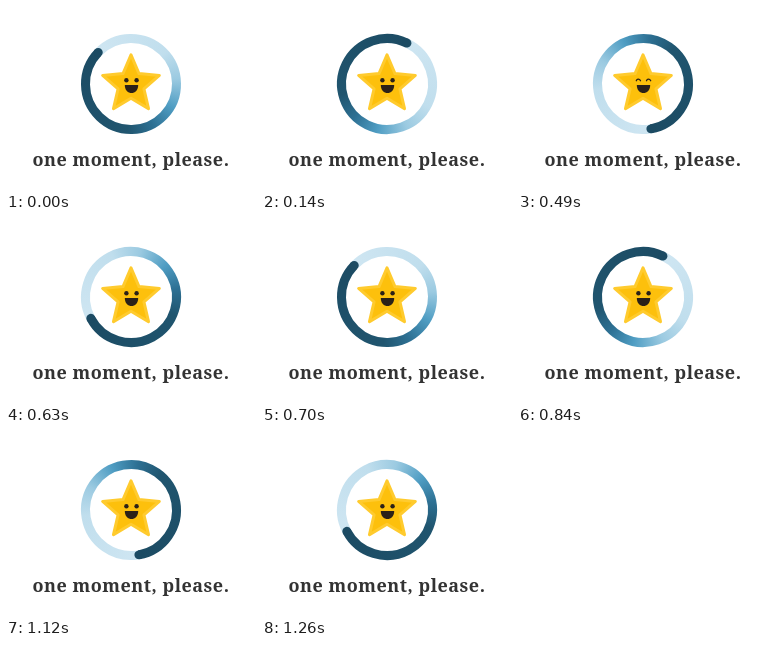
An HTML page with a canvas for the animation above (1400 ms loop, 250 by 185 pixels).

```html
<!DOCTYPE html>
<html lang="en">
<head>
<meta charset="utf-8">
<title>One moment, please</title>
<style>
  html, body { margin: 0; width: 100%; height: 100%; overflow: hidden; background: #fff; }
  canvas { display: block; width: 250px; height: 185px; }
</style>
</head>
<body>
<canvas id="stage"></canvas>
<script>
const W = 250, H = 185, LOOP = 1400, STEP = 140;
const CX = 125, CY = 78, RING = 45.5, BAND = 9;
const TAU = Math.PI * 2, DEG = Math.PI / 180;
const INK = '#2b2118';

const canvas = document.getElementById('stage');
const ctx = canvas.getContext('2d');
const dpr = window.devicePixelRatio || 1;
canvas.width = W * dpr;
canvas.height = H * dpr;

function dot(x, y, r, color) {
  ctx.fillStyle = color;
  ctx.beginPath();
  ctx.arc(x, y, r, 0, TAU);
  ctx.fill();
}

// The ring fades from its pale tail clockwise to the dark rounded head.
function drawRing(turn) {
  ctx.save();
  ctx.translate(CX, CY);
  ctx.rotate((turn - 90) * DEG);
  const fade = ctx.createConicGradient(0, 0, 0);
  const stops = [
    [0, '#cfe6f2'], [0.26, '#c0deed'], [0.36, '#9bcae1'], [0.46, '#4f9dc3'],
    [0.55, '#2d7093'], [0.64, '#20556f'], [1, '#1c4b63']
  ];
  for (const [at, color] of stops) fade.addColorStop(at, color);
  ctx.strokeStyle = fade;
  ctx.lineWidth = BAND;
  ctx.beginPath();
  ctx.arc(0, 0, RING, 0, TAU);
  ctx.stroke();
  dot(RING, 0, BAND / 2, '#1c4b63');
  ctx.restore();
}

function drawStar() {
  ctx.beginPath();
  for (let i = 0; i < 10; i++) {
    const r = i % 2 ? 13.6 : 29.8;
    const a = i * TAU / 10 - TAU / 4;
    ctx.lineTo(CX + r * Math.cos(a), CY + 0.6 + r * Math.sin(a));
  }
  ctx.closePath();
  ctx.lineJoin = 'round';
  ctx.lineWidth = 3;
  ctx.strokeStyle = '#ffcb2e';
  ctx.fillStyle = '#fdc00c';
  ctx.fill();
  ctx.stroke();
}

function drawFace(blink) {
  for (const x of [CX - 4.6, CX + 5.6]) {
    if (blink) {
      ctx.strokeStyle = INK;
      ctx.lineWidth = 1.3;
      ctx.lineCap = 'round';
      ctx.beginPath();
      ctx.arc(x, 75.4, 2.2, Math.PI * 1.1, Math.PI * 1.9);
      ctx.stroke();
    } else {
      dot(x, 74.2, 2.2, INK);
    }
  }
  ctx.fillStyle = INK;
  ctx.beginPath();
  ctx.moveTo(118.8, 79);
  ctx.lineTo(132.2, 79);
  ctx.bezierCurveTo(132.2, 89.8, 118.8, 89.8, 118.8, 79);
  ctx.fill();
}

function drawLabel() {
  ctx.font = 'bold 18px "Noto Serif", serif';
  ctx.letterSpacing = '0.5px';
  ctx.textBaseline = 'alphabetic';
  ctx.fillStyle = '#333';
  ctx.fillText('one moment, please.', 26.5, 160);
}

function draw(now) {
  const t = now % LOOP;
  ctx.setTransform(dpr, 0, 0, dpr, 0, 0);
  ctx.fillStyle = '#fff';
  ctx.fillRect(0, 0, W, H);
  drawRing(314 + 72 * Math.floor(t / STEP));
  drawStar();
  drawFace(t >= 490 && t < 630);
  drawLabel();
}

const start = performance.now();
function tick() {
  draw(performance.now() - start);
  requestAnimationFrame(tick);
}
tick();
</script>
</body>
</html>
```
